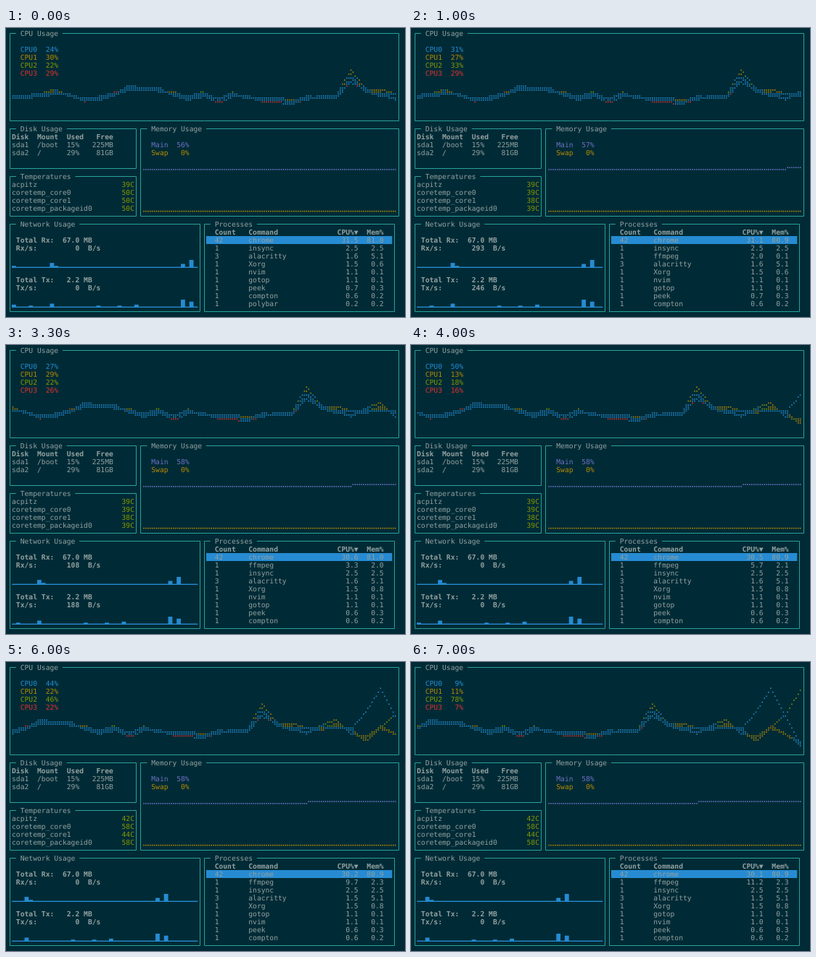
Animation, 550 px wide and 400 px high, one loop 8000 ms. Source, as an HTML page with a canvas:

```html
<!DOCTYPE html>
<html lang="en">
<head>
<meta charset="utf-8">
<title>System monitor</title>
<style>
html, body { margin: 0; width: 100%; height: 100%; overflow: hidden; background: #002b36; }
canvas { display: block; }
</style>
</head>
<body>
<canvas id="screen" width="550" height="400"></canvas>
<script>
const ctx = document.getElementById('screen').getContext('2d');
const LOOP = 8000;
const TICKS = [1000, 2000, 3300, 4000, 5000, 6000, 7000];

// Terminal grid
const CW = 5.825, CH = 11, LEFT = 2.2, TOP = 2;
const FONT = '9.68px "DejaVu Sans Mono", monospace';
const BG = '#002b36', FG = '#93a1a1', TEAL = '#2aa198', BLUE = '#268bd2';
const YELLOW = '#b58900', GREEN = '#859900', RED = '#dc322f', VIOLET = '#6c71c4';

const colX = col => LEFT + col * CW;
const rowY = row => TOP + row * CH;

// Load per second, oldest first; the last seven arrive during the loop
const HISTORY = 27, DOTS_PER_TICK = 7;
const cpu = [
  { color: BLUE, load: [25, 26, 28, 31, 28, 22, 24, 27, 36, 38, 38, 27, 23, 26, 24, 27, 25,
    23, 23, 18, 24, 26, 24, 49, 33, 27, 24, 31, 30, 27, 50, 80, 44, 9] },
  { color: YELLOW, load: [27, 25, 29, 33, 28, 23, 26, 29, 41, 36, 33, 32, 24, 30, 23, 31, 24,
    22, 25, 21, 22, 28, 26, 54, 32, 35, 30, 27, 32, 29, 13, 29, 22, 11] },
  { color: GREEN, load: [24, 27, 30, 35, 26, 24, 22, 28, 38, 34, 35, 29, 26, 32, 22, 29, 26,
    24, 22, 20, 26, 25, 28, 60, 36, 31, 22, 33, 40, 22, 18, 30, 46, 78] },
  { color: RED, load: [27, 24, 27, 29, 29, 20, 25, 31, 34, 36, 36, 28, 22, 28, 18, 26, 27,
    20, 19, 16, 23, 27, 24, 45, 35, 30, 29, 29, 35, 26, 16, 31, 22, 7] },
];
const memory = [56, 57, 57, 58, 58, 58, 58, 58];
const rxRate = [0, 293, 384, 108, 0, 0, 0, 0];
const txRate = [0, 246, 552, 188, 0, 0, 0, 0];
// [column, height in eighths]
const rxBars = [[1, 2], [10, 5], [11, 2], [41, 4], [43, 8]];
const txBars = [[1, 3], [5, 2], [10, 4], [21, 2], [26, 2], [30, 3], [41, 8], [43, 6]];

const chrome = ['31.5 81.0', '31.1 80.9', '30.8 81.0', '30.6 81.0',
  '30.5 80.9', '30.4 80.9', '30.2 80.9', '30.1 80.9'];
const ffmpeg = ['', '2.0 0.1', '4.2 2.0', '3.3 2.0', '5.7 2.1', '8.1 2.2', '9.7 2.3', '11.2 2.3'];
const xorgMem = ['0.6', '0.6', '0.7', '0.8', '0.8', '0.8', '0.8', '0.8'];

function processes(n) {
  const list = [
    '42 chrome ' + chrome[n],
    '1 insync 2.5 2.5',
    `3 alacritty ${n < 5 ? '1.6' : '1.5'} 5.1`,
    '1 Xorg 1.5 ' + xorgMem[n],
    ...(n < 5 ? ['1 nvim 1.1 0.1', '1 gotop 1.1 0.1']
      : ['1 gotop 1.1 0.1', `1 nvim ${n < 7 ? '1.1' : '1.0'} 0.1`]),
    `1 peek ${n < 2 ? '0.7' : '0.6'} 0.3`,
    '1 compton 0.6 0.2',
    '1 polybar 0.2 0.2',
  ];
  if (n > 0) list.splice(n === 1 ? 2 : 1, 0, '1 ffmpeg ' + ffmpeg[n]);
  return list.slice(0, 9).map(line => line.split(' '));
}

function text(col, row, string, color = FG, bold = false) {
  ctx.font = (bold ? 'bold ' : '') + FONT;
  ctx.fillStyle = color;
  [...string].forEach((char, i) => {
    if (char !== ' ') ctx.fillText(char, colX(col + i), rowY(row) + 9);
  });
}

const bold = (col, row, string) => text(col, row, string, FG, true);

function box(title, col1, row1, col2, row2) {
  const edgeX = col => Math.floor(colX(col) + CW / 2) + 0.5;
  const edgeY = row => rowY(row) + CH / 2;
  const [x1, x2, y1, y2] = [edgeX(col1), edgeX(col2), edgeY(row1), edgeY(row2)];
  ctx.strokeStyle = TEAL;
  ctx.lineWidth = 1;
  ctx.beginPath();
  ctx.moveTo(colX(col1 + 2), y1);
  ctx.lineTo(x1, y1);
  ctx.lineTo(x1, y2);
  ctx.lineTo(x2, y2);
  ctx.lineTo(x2, y1);
  ctx.lineTo(colX(col1 + 4 + title.length), y1);
  ctx.stroke();
  text(col1 + 3, row1, title);
}

// Braille plot: 2 x 4 dots per cell, each cell takes the colour of the last series in it
function plot(col, row, cols, rows, series) {
  const cells = new Map();
  const height = rows * 4;
  for (const { color, valueAt } of series) {
    for (let x = 0; x < cols * 2; x++) {
      const y = height - 1 - Math.floor(valueAt(cols * 2 - 1 - x) / 100 * (height - 1));
      const key = (x >> 1) + ',' + (y >> 2);
      const cell = cells.get(key) || { dots: new Map() };
      cell.color = color;
      cell.dots.set(x + ',' + y, [x, y]);
      cells.set(key, cell);
    }
  }
  for (const { color, dots } of cells.values()) {
    ctx.fillStyle = color;
    for (const [x, y] of dots.values()) {
      ctx.fillRect(colX(col) + (x + 0.5) * CW / 2 - 0.8, rowY(row) + (y + 0.5) * CH / 4 - 0.8, 1.6, 1.6);
    }
  }
}

function loadAt(load, n, age) {
  const at = Math.max(0, HISTORY - 1 + n - age / DOTS_PER_TICK);
  const i = Math.floor(at), next = Math.min(i + 1, load.length - 1);
  return load[i] + (load[next] - load[i]) * (at - i);
}

function sparkline(row, bars, n) {
  const bottom = rowY(row + 1);
  ctx.fillStyle = BLUE;
  ctx.fillRect(colX(1), bottom - CH / 8, 44 * CW, CH / 8);
  for (const [col, eighths] of bars) {
    const h = eighths * CH / 8;
    if (col > n) ctx.fillRect(colX(col - n), bottom - h, CW, h);
  }
}

function drawCpu(n) {
  box('CPU Usage', 0, 0, 92, 11);
  const series = cpu.map(({ color, load }) => ({ color, valueAt: age => loadAt(load, n, age) }));
  plot(1, 1, 91, 10, series.reverse());
  cpu.forEach(({ color, load }, i) => {
    const now = String(load[HISTORY - 1 + n]).padStart(4);
    text(3, 2 + i, `CPU${i}${now}%`, color);
  });
}

function drawDisk() {
  box('Disk Usage', 0, 12, 30, 17);
  bold(1, 13, 'Disk  Mount  Used   Free');
  text(1, 14, 'sda1  /boot  15%   225MB');
  text(1, 15, 'sda2  /      29%    81GB');
}

function drawTemperatures(n) {
  box('Temperatures', 0, 18, 30, 23);
  const degrees = n === 0 ? [39, 50, 50, 50] : n < 6 ? [39, 39, 38, 39] : [42, 58, 44, 58];
  ['acpitz', 'coretemp_core0', 'coretemp_core1', 'coretemp_packageid0'].forEach((name, i) => {
    text(1, 19 + i, name);
    text(27, 19 + i, degrees[i] + 'C', GREEN);
  });
}

function drawMemory(n) {
  box('Memory Usage', 31, 12, 92, 23);
  const main = age => memory[Math.max(0, n - Math.floor(age / DOTS_PER_TICK))];
  plot(32, 13, 60, 10, [
    { color: YELLOW, valueAt: () => 0 },
    { color: VIOLET, valueAt: main },
  ]);
  text(34, 14, `Main  ${memory[n]}%`, VIOLET);
  text(34, 15, 'Swap   0%', YELLOW);
}

function drawNetwork(n) {
  box('Network Usage', 0, 24, 45, 35);
  const rate = value => String(value).padStart(10) + '  B/s';
  bold(2, 26, 'Total Rx:  67.0 MB');
  bold(2, 27, 'Rx/s:' + rate(rxRate[n]));
  sparkline(29, rxBars, n);
  bold(2, 31, 'Total Tx:   2.2 MB');
  bold(2, 32, 'Tx/s:' + rate(txRate[n]));
  sparkline(34, txBars, n);
}

function drawProcesses(n) {
  box('Processes', 46, 24, 91, 35);
  bold(49, 25, 'Count');
  bold(57, 25, 'Command');
  bold(78, 25, 'CPU%▼');
  bold(85, 25, 'Mem%');
  ctx.fillStyle = BLUE;
  ctx.fillRect(colX(47), rowY(26), 44 * CW, CH);
  processes(n).forEach(([count, command, load, mem], i) => {
    text(49, 26 + i, count);
    text(57, 26 + i, command);
    text(83 - load.length, 26 + i, load);
    text(89 - mem.length, 26 + i, mem);
  });
}

function draw(n) {
  ctx.textRendering = 'geometricPrecision';
  ctx.fillStyle = BG;
  ctx.fillRect(0, 0, 550, 400);
  drawCpu(n);
  drawDisk();
  drawTemperatures(n);
  drawMemory(n);
  drawNetwork(n);
  drawProcesses(n);
}

const start = performance.now();
let shown = -1;
function frame() {
  const time = (performance.now() - start) % LOOP;
  const n = TICKS.filter(tick => time >= tick).length;
  if (n !== shown) draw(shown = n);
  requestAnimationFrame(frame);
}
frame();
</script>
</body>
</html>
```
